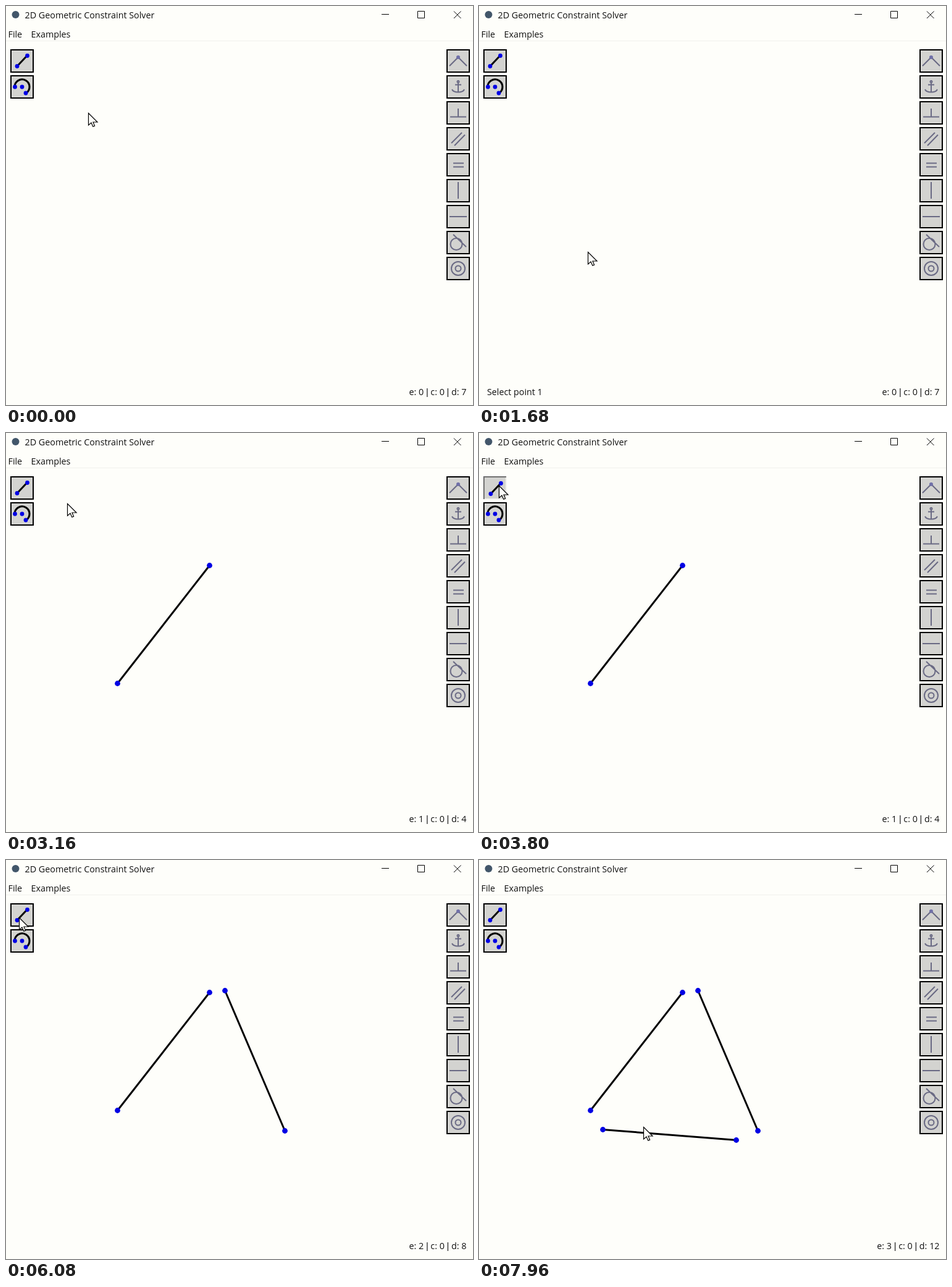
An HTML page for the animation above (8 s loop, 756 by 646 pixels).

```html
<!DOCTYPE html>
<html lang="en">
<head>
<meta charset="utf-8">
<title>2D Geometric Constraint Solver</title>
<style>
  html, body { margin: 0; width: 100%; height: 100%; overflow: hidden; background: #fefefa; }
  svg { display: block; font: 14.3px "Open Sans", "Noto Sans", sans-serif; }
  text { fill: #101010; white-space: pre; }
  .bar { font-family: "Liberation Sans", sans-serif; }
  .line { fill: none; stroke: #000; stroke-width: 3; }
  .dot { fill: #0000e4; }
  .icon { fill: none; stroke: #6a6a84; stroke-width: 2; }
  .box { fill: #d3d3d0; stroke: #000; stroke-width: 2; }
  .thin { fill: none; stroke: #000; }
</style>
</head>
<body>
<svg width="756" height="646" viewBox="0 0 756 646">
  <circle cx="15.5" cy="14" r="6" fill="#42566a"/>
  <text x="30.5" y="20">2D Geometric Constraint Solver</text>
  <path class="thin" d="M608 13.5h12M666.5 8.5h11v11h-11zM725 8.5l11.5 11.5m0-11.5l-11.5 11.5"/>
  <text x="3.5" y="51">File</text>
  <text x="40.5" y="51">Examples</text>
  <path d="M0 56.5h756" stroke="#f0f0ec"/>

  <g transform="translate(7 70)">
    <rect id="face" class="box" x="1" y="1" width="36" height="36"/>
    <path id="sunk" d="M1 37V1h36" fill="none" stroke="#707070" stroke-width="2"/>
    <g id="lineIcon">
      <path class="line" d="M11 27.5L27 10.5"/>
      <circle class="dot" cx="11" cy="27.5" r="3.4"/>
      <circle class="dot" cx="27.5" cy="10.5" r="3.4"/>
    </g>
  </g>
  <g transform="translate(7 112)">
    <rect class="box" x="1" y="1" width="36" height="36"/>
    <path class="line" d="M7 19A12 12 0 1 1 25.5 29"/>
    <circle class="dot" cx="7.5" cy="19" r="3.4"/>
    <circle class="dot" cx="19" cy="19" r="3.4"/>
    <circle class="dot" cx="25" cy="29" r="3.4"/>
  </g>
  <g id="constraints"></g>

  <text id="status" x="13" y="630"></text>
  <text x="745.5" y="630" text-anchor="end">e: <tspan id="edges"></tspan> <tspan class="bar">|</tspan> c: 0 <tspan class="bar">|</tspan> d: <tspan id="freedom"></tspan></text>
  <g id="segments"></g>
  <path id="cursor" d="M.5 .5V20L5 16L7.8 22.3L10.6 21.1L8 15H15z" fill="#fefefa" stroke="#000" stroke-width="1.2"/>
</svg>
<script>
const LOOP = 8000;
const el = id => document.getElementById(id);
const ring = (x, y, r) => `M${x - r} ${y}a${r} ${r} 0 1 0 ${2 * r} 0a${r} ${r} 0 1 0 ${-2 * r} 0`;

const icons = [
  "M5 27L19 13L33 27",
  ring(19, 10.5, 1.5) + "M19 12V28M14 15.5h10M9 23Q11 27.5 19 27.5T29 23",
  "M6 25.5h26M19 12v13",
  "M8 26L25 9M13 30L30 12.5",
  "M11 16.5h17M11 22.5h17",
  "M19 5v27",
  "M5 19h28",
  ring(16, 21.5, 9.5) + "M11 6L32 26",
  ring(19, 19, 11) + ring(19, 19, 4.5)
];
el("constraints").innerHTML = icons.map((d, i) =>
  `<g transform="translate(713 ${70 + 42 * i})"><rect class="box" x="1" y="1" width="36" height="36"/>` +
  `<path class="icon" d="${d}"/></g>`).join("") +
  `<circle cx="732" cy="83" r="3" fill="#7070a8"/>`;

// One round per line: button press, first click and second click (ms), places and freedom left
const rounds = [
  { press: 560, first: 1960, done: 2600, home: [30, 86], a: [180, 405], b: [329, 214], d: 4 },
  { press: 3720, first: 4460, done: 5320, home: [32, 85], a: [354, 211], b: [451, 438], d: 8 },
  { press: 6280, first: 7040, done: 7720, home: [20, 92], a: [200, 436], b: [416, 453], d: 12 }
];
const HOLD = 130;

const dot = ([x, y]) => `<circle class="dot" cx="${x + .5}" cy="${y + .5}" r="4.4"/>`;
el("segments").innerHTML = rounds.map(({ a, b }) =>
  `<g><path class="line" transform="translate(.5 .5)" d="M${a}L${b}"/>${dot(a)}${dot(b)}</g>`).join("");
const segments = [...el("segments").children];

// Cursor legs: leave time, arrival time, destination
const legs = [];
let leave = 0;
for (const r of rounds) {
  legs.push([leave, r.press - 160, r.home],
            [r.press + HOLD, r.first - 100, r.a],
            [r.first + 40, r.done, r.b]);
  leave = r.done + 120;
}
legs.push([leave, LOOP, [256, 431]]);

function cursorAt(t) {
  let pos = [134, 173];
  for (const [from, to, goal] of legs) {
    if (t < from) break;
    const u = Math.min(1, (t - from) / (to - from));
    const ease = 1 - (1 - u) ** 2;
    pos = pos.map((p, i) => p + (goal[i] - p) * ease);
  }
  return pos.map(Math.round);
}

function draw(t) {
  const made = rounds.filter(r => t >= r.done).length;
  const current = rounds.find(r => t >= r.press + HOLD && t < r.done);
  const pressed = rounds.some(r => t >= r.press && t < r.press + HOLD);

  el("status").textContent = current ? "Select point " + (t < current.first ? 1 : 2) : "";
  el("edges").textContent = made;
  el("freedom").textContent = made ? rounds[made - 1].d : 7;
  segments.forEach((s, i) => s.style.display = i < made ? "" : "none");

  el("face").style.stroke = pressed ? "#f2f2ee" : "";
  el("sunk").style.display = pressed ? "" : "none";
  el("lineIcon").setAttribute("transform", pressed ? "translate(1 1)" : "");
  el("cursor").setAttribute("transform", `translate(${cursorAt(t)})`);
}

const start = performance.now();
function tick() {
  draw((performance.now() - start) % LOOP);
  requestAnimationFrame(tick);
}
tick();
</script>
</body>
</html>
```
